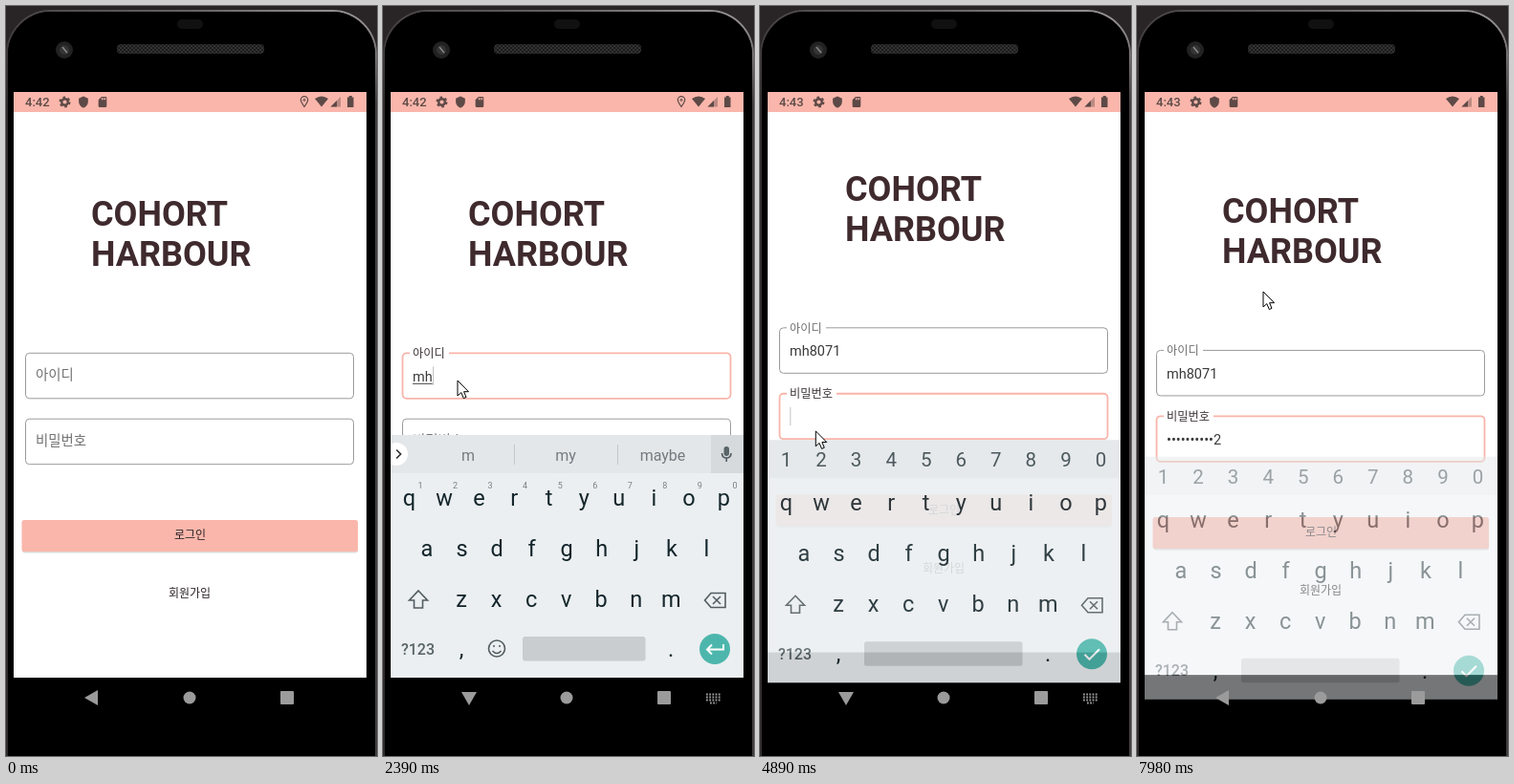
These frames come from a looping animation (388x785 px, 8000 ms). An HTML page:

```html
<!DOCTYPE html>
<html lang="ko">
<head>
<meta charset="utf-8">
<style>
  html, body { margin: 0; width: 100%; height: 100%; overflow: hidden; background: #000; }
  svg { display: block; width: 388px; height: 785px; font-family: Roboto, "Noto Sans CJK KR", "Noto Sans CJK", sans-serif; }
  .ko { font-family: "Noto Sans CJK KR", "Noto Sans CJK", sans-serif; }
  .mid { text-anchor: middle; }
  .field { fill: none; stroke: #9a9a9a; }
  .field.on { stroke: #f9b5aa; stroke-width: 1.8; }
  .input { font-size: 14.5px; fill: #3a3a3a; }
  .key { font-size: 23.5px; fill: #14262c; }
  .line { fill: none; stroke: #525c61; stroke-width: 1.6; }
</style>
</head>
<body>
<svg viewBox="0 0 388 785">
  <defs>
    <linearGradient id="rim" x2="1" y2="0">
      <stop stop-color="#4b4648"/><stop offset=".5" stop-color="#6b6668"/><stop offset="1" stop-color="#a5a1a3"/>
    </linearGradient>
    <linearGradient id="fade" x2="0" y2="1"><stop stop-color="#fff"/><stop offset=".13" stop-color="#333"/></linearGradient>
    <mask id="rimFade"><rect width="388" height="785" fill="url(#fade)"/></mask>
    <pattern id="mesh" width="4" height="4" patternUnits="userSpaceOnUse">
      <rect width="4" height="4" fill="#1b1b1b"/><path d="M0 0 4 4M4 0 0 4" stroke="#393939" stroke-width=".8"/>
    </pattern>
    <clipPath id="screen"><rect x="8" y="90" width="369" height="613"/></clipPath>
    <clipPath id="side"><rect x="8" y="90" width="369" height="695"/></clipPath>
  </defs>

  <!-- phone body -->
  <rect width="388" height="785" fill="#292526"/>
  <rect x="1" y="5" width="386" height="840" rx="46" fill="#000" stroke="url(#rim)" stroke-width="2" mask="url(#rimFade)"/>
  <rect x="2" y="6" width="384" height="840" rx="45"/>
  <rect x="179" y="14" width="27" height="10" rx="5" fill="#111"/>
  <rect x="116" y="40" width="154" height="10" rx="4" fill="url(#mesh)"/>
  <circle cx="61" cy="46" r="9" fill="#222"/><circle cx="61" cy="46" r="5" fill="#343434"/>
  <path d="M59 43 64 49" stroke="#888" stroke-width="1.5"/>

  <!-- login page -->
  <g clip-path="url(#screen)">
    <g id="page">
      <rect x="8" y="111" width="369" height="592" fill="#fff"/>
      <g font-size="36" font-weight="700" fill="#3f2a2e">
        <text x="89" y="230">COHORT</text><text x="89" y="272">HARBOUR</text>
      </g>
      <g id="fields"></g>
      <rect x="17" y="540" width="351" height="32.5" rx="3" fill="#000" opacity=".14"/>
      <rect x="16.5" y="538" width="351.5" height="33" rx="2.5" fill="#fab6ab"/>
      <g class="ko mid" font-size="12" font-weight="500" fill="#2b2325">
        <text x="192.5" y="558">로그인</text><text x="192" y="619">회원가입</text>
      </g>
    </g>
  </g>

  <!-- status bar -->
  <rect x="8" y="90" width="369" height="21" fill="#fab6ab"/>
  <g fill="#5d4946">
    <text id="clock" x="20" y="105.3" font-size="13" font-weight="500"></text>
    <g fill="none" stroke="#5d4946">
      <circle cx="61.5" cy="100.5" r="3.3" stroke-width="2.4"/>
      <circle cx="61.5" cy="100.5" r="5" stroke-width="2" stroke-dasharray="2.6 2.636"/>
      <g id="pin"><path d="M312 105.5C309.500 102 308.300 100 308.300 98.300A3.700 3.700 0 0 1 315.700 98.300C315.700 100 314.500 102 312 105.500Z" stroke-width="1.2"/><circle cx="312" cy="98.400" r="1"/></g>
    </g>
    <path transform="translate(74.500 94) scale(.54)" d="M12 1 3 5v6c0 5.550 3.840 10.740 9 12 5.160-1.260 9-6.450 9-12V5z"/>
    <path transform="translate(94.500 94) scale(.54)" d="M18 2h-8L4 8v12q0 2 2 2h12q2 0 2-2V4q0-2-2-2zm-6 6h-2V4h2zm3 0h-2V4h2zm3 0h-2V4h2z"/>
    <path d="M323 97Q330 92 337 97L330 105.500Z"/>
    <path d="M350 95V105.500H339.500Z" opacity=".4"/><path d="M346 99V105.500H339.500Z"/>
    <path d="M357 95.500H358.800V94H361.800V95.500H363.500V106H357Z"/>
  </g>

  <!-- keyboard -->
  <g clip-path="url(#side)"><g id="keyboard">
    <rect x="8" y="449" width="369" height="254" fill="#ebeff1"/>
    <rect x="8" y="449" width="369" height="40" fill="#e3e7e9"/>
    <g id="keys"></g>
    <path class="line" d="M37 612 46.500 622H41.500V630H32.500V622H27.500Z"/>
    <path class="line" d="M343 614.500H358V629.500H343L336.500 622ZM345 618 353 626M353 618 345 626"/>
    <text class="mid" x="36.500" y="678.500" font-size="16" font-weight="500" fill="#596469">?123</text>
    <text class="key mid" x="82" y="681">,</text><text class="key mid" x="301" y="681">.</text>
    <rect id="space" y="660" height="25.500" rx="2.500" fill="#c9cdd0"/>
    <circle cx="347" cy="673" r="16" fill="#4db6ac"/>
    <g id="textMode">
      <rect x="343" y="449" width="34" height="40" fill="#d6dadd"/>
      <rect x="356.500" y="461" width="5.500" height="10" rx="2.700" fill="#596469"/>
      <path class="line" d="M354.500 468Q354.500 473 359.200 473T364 468M359.200 473V477"/>
      <circle cx="14" cy="469" r="12" fill="#fff"/>
      <path d="M14 464.500 18.500 469 14 473.500" fill="none" stroke="#333" stroke-width="1.700"/>
      <g id="suggest" class="mid" font-size="16" fill="#747b80">
        <path d="M137.500 459V480M245.500 459V480" stroke="#c3c8cb"/>
        <text x="89" y="475.500"></text><text x="191" y="475.500"></text><text x="292.500" y="475.500"></text>
      </g>
      <g id="hints" class="mid" font-size="9" fill="#788085"></g>
      <circle class="line" cx="119" cy="672.500" r="8.500"/>
      <path class="line" d="M114.500 675Q119 680 123.500 675M115 670H117M121 670H123"/>
      <path d="M356 668V673.500H339M344 668.500 339 673.500 344 678.500" fill="none" stroke="#fff" stroke-width="2"/>
    </g>
    <g id="passMode">
      <g id="numbers" class="mid" font-size="20.500" fill="#35444a"></g>
      <path d="M339.500 673.500 344.500 678.500 355 668" fill="none" stroke="#fff" stroke-width="2"/>
    </g>
  </g></g>

  <!-- navigation -->
  <g fill="#9b9b9b">
    <path id="back"/><circle cx="192" cy="724" r="6.500"/><rect x="287" y="717" width="14" height="14" rx="1"/>
    <path id="switcher" d="M338 720.500H353M338 723.500H353M338 726.500H353M342 729.500H349" stroke="#9b9b9b" stroke-width="1.800" stroke-dasharray="1.800 1.400"/>
  </g>

  <circle id="press" r="15" fill="#ffff6b" style="mix-blend-mode:multiply"/>
  <path id="cursor" d="M0 0V16L3.800 12.600 6.300 18.600 9 17.400 6.600 11.700H11.500Z" fill="#fff" stroke="#000"/>
</svg>
<script>
const $ = id => document.getElementById(id);
const clamp = v => Math.max(0, Math.min(1, v));
const ramp = (t, a, b) => clamp((t - a) / (b - a));
const easeOut = x => 1 - (1 - x) ** 2;
const smooth = x => x * x * (3 - 2 * x);
const show = (el, on) => el.style.display = on ? '' : 'none';
const countUntil = (times, t) => times.filter(at => t >= at).length;

const PITCH = 36.55;
const row = (chars, x, y, cls = '') =>
  [...chars].map((c, i) => `<text class="${cls}" x="${x + i * PITCH}" y="${y}">${c}</text>`).join('');
$('keys').innerHTML = row('qwertyuiop', 27.5, 523, 'key mid') + row('asdfghjkl', 46, 576, 'key mid') + row('zxcvbnm', 82, 629, 'key mid');
$('hints').innerHTML = row('1234567890', 39, 505);
$('numbers').innerHTML = row('1234567890', 27.5, 477);

function makeField(label, top, gapWidth) {
  const g = document.createElementNS('http://www.w3.org/2000/svg', 'g');
  g.innerHTML = `<rect class="field" x="20.5" y="${top}" width="343" height="47.5" rx="4"/>
    <rect x="28" y="${top - 2}" height="4" fill="#fff"/>
    <text class="ko" x="31">${label}</text><text class="input" x="31" y="${top + 29.5}"></text>
    <path d="M0 ${top + 14}v19.5" stroke="#c4c4c4"/>
    <path stroke="#444"/>`;
  $('fields').append(g);
  const [box, gap, name, input, caret, underline] = g.children;
  return (value, float, focused, hasCaret, composing) => {
    box.classList.toggle('on', focused);
    gap.setAttribute('width', gapWidth * float);
    name.setAttribute('y', top + 28 - 23.3 * float);
    name.setAttribute('font-size', 14.4 - 2.2 * float);
    name.setAttribute('fill', focused ? '#3c3436' : '#707070');
    input.textContent = value;
    const end = 31 + (value ? input.getComputedTextLength() : 0);
    caret.setAttribute('transform', `translate(${end + .8})`);
    show(caret, hasCaret);
    underline.setAttribute('d', `M31 ${top + 32}H${end}`);
    show(underline, composing);
  };
}
const drawId = makeField('아이디', 363.3, 41);
const drawPassword = makeField('비밀번호', 432.2, 52);

const ID = 'mh8071', PASSWORD = '40718365942';
const idTimes = [2390, 2390, 2620, 2700, 2770, 2940];
const passTimes = [5210, 5280, 5430, 5660, 5660, 5830, 6120, 6430, 6600, 6750, 7130];
const path = [[300, 244, 584], [460, 219, 515], [690, 219, 515], [1260, 78, 392], [3640, 78, 392],
  [4270, 59, 449], [4500, 60, 450], [4700, 60, 450], [4950, 58, 444], [7380, 58, 444], [7980, 132, 299], [8000, 132, 299]];

function cursorAt(t) {
  const i = Math.max(1, path.findIndex(p => p[0] > t));
  const [t0, x0, y0] = path[i - 1], [t1, x1, y1] = path[i];
  const k = smooth(ramp(t, t0, t1));
  return `translate(${x0 + (x1 - x0) * k} ${y0 + (y1 - y0) * k})`;
}

function draw(t) {
  const inPassword = t >= 4600;
  const idLength = countUntil(idTimes, t), passLength = countUntil(passTimes, t);
  const composing = t >= 2390 && t < 2620;

  drawId(ID.slice(0, idLength), smooth(ramp(t, 1520, 1690)), t >= 1520 && t < 4650, t >= 1560 && t < 4340, composing);
  drawPassword('•'.repeat(Math.max(0, passLength - 1)) + (passLength ? PASSWORD[passLength - 1] : ''),
    smooth(ramp(t, 4650, 4820)), t >= 4650, t >= 4340 && t < 7860, false);

  const pan = 30 * (easeOut(ramp(t, 4740, 4970)) - easeOut(ramp(t, 7850, 8040)));
  $('page').setAttribute('transform', `translate(0 ${-pan})`);

  const up = easeOut(ramp(t, 1630, 1870)) - ramp(t, 3560, 3760) + easeOut(ramp(t, 4740, 4970)) - ramp(t, 7900, 8060);
  $('keyboard').setAttribute('transform', `translate(0 ${45 * (1 - up)})`);
  $('keyboard').style.opacity = up;
  show($('textMode'), !inPassword);
  show($('passMode'), inPassword);
  $('space').setAttribute('x', inPassword ? 109 : 146);
  $('space').setAttribute('width', inPassword ? 165.5 : 128.5);
  show($('suggest'), composing);
  const words = t < 2470 ? ['m', 'my', 'maybe'] : ['mh', 'my', 'MH'];
  $('suggest').querySelectorAll('text').forEach((el, i) => el.textContent = words[i]);

  const typing = (t >= 1600 && t < 3560) || (t >= 4720 && t < 7880);
  $('back').setAttribute('d', typing ? 'M82 718H98L90 732Z' : 'M82 724 96 716V732Z');
  show($('switcher'), typing);

  $('clock').textContent = t < 3600 ? '4:42' : '4:43';
  show($('pin'), t < 2470);

  const spot = cursorAt(t);
  for (const id of ['cursor', 'press']) $(id).setAttribute('transform', spot);
  show($('cursor'), t >= 300);
  show($('press'), (t >= 1280 && t < 1520) || (t >= 4460 && t < 4680));
}

(function tick() {
  draw(performance.now() % 8000);
  requestAnimationFrame(tick);
})();
</script>
</body>
</html>
```
